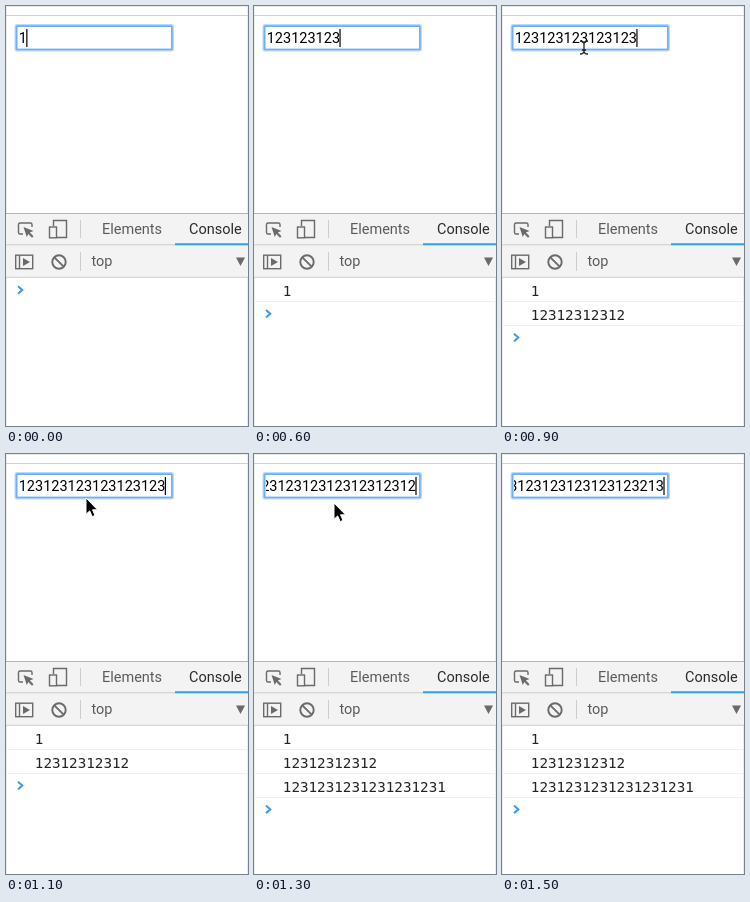
An HTML page for the animation above (1.6 s loop, 242 by 420 pixels).

```html
<!DOCTYPE html>
<html lang="en">
<head>
<meta charset="utf-8">
<style>
  html, body { margin: 0; width: 100%; height: 100%; overflow: hidden; background: #fff; }
  svg { display: block; width: 242px; height: 420px; }
  text { font: 14.5px Roboto, sans-serif; }
  .log text { font: 14.25px "DejaVu Sans Mono", monospace; fill: #222; }
  .icon { fill: none; stroke: #6a6a6a; stroke-width: 1.4; }
  .solid { fill: #6a6a6a; stroke: none; }
</style>
</head>
<body>
<svg viewBox="0 0 242 420">
  <clipPath id="inner"><rect x="12" y="21" width="153" height="23"/></clipPath>
  <path d="M0 .5H242M.5 0V420M241.5 0V420" stroke="#ececec"/>
  <path d="M0 9.5H242" stroke="#d2d2d2"/>

  <rect x="8.5" y="18" width="159.5" height="27.5" rx="2.5" fill="#b9dafb"/>
  <rect x="9.7" y="19.2" width="157" height="25" rx="1.5" fill="#6eaff5"/>
  <rect x="11.5" y="21" width="153.5" height="21.6" fill="#fff"/>
  <g clip-path="url(#inner)">
    <text id="value" y="37"/>
    <path id="caret" d="M0 23V41" stroke="#000" stroke-width="1.2"/>
  </g>

  <rect y="207" width="242" height="64" fill="#f3f3f3"/>
  <path d="M0 207.5H242" stroke="#b4b4b4"/>
  <path d="M0 238.8H242M0 271.3H242M74.5 214V232M74.5 246V265" stroke="#cdcdcd"/>
  <path d="M169 238.3H242" stroke="#2ea3e6" stroke-width="2"/>
  <text x="96" y="228" fill="#5a5a5a">Elements</text>
  <text x="183" y="228" fill="#2b2b2b">Console</text>
  <text x="85.5" y="260.3" fill="#5a5a5a">top</text>
  <path class="solid" d="M230 251.5H239L234.5 260Z"/>

  <g class="icon">
    <path d="M17 228H14Q12.500 228 12.500 226.500V218.500Q12.500 217 14 217H24.500Q26 217 26 218.500V221"/>
    <path class="solid" d="M17.500 221L27.500 225L23.800 226.500L27.500 230.300L26 231.800L22.300 228L20.800 231Z"/>
    <path d="M47.500 220V214.500H60.500V231.500H51"/>
    <rect x="43.500" y="221" width="7" height="10.800"/>
    <rect x="9.700" y="249.200" width="17" height="13.500"/>
    <path d="M13.500 249V263"/>
    <path class="solid" d="M17 252L24 256L17 260Z"/>
    <circle cx="53" cy="256" r="6.700" stroke-width="1.900"/>
    <path d="M48.300 251.300L57.700 260.700" stroke-width="1.900"/>
  </g>

  <g class="log"></g>
  <path id="prompt" d="M12 -3.800L16.300 0L12 3.800" fill="none" stroke="#3b9ae8" stroke-width="2"/>

  <path id="beam" d="M-4 -6Q0 -6 0 -3Q0 -6 4 -6M0 -3V4M-4 7Q0 7 0 4Q0 7 4 7M-2 3H2" fill="none" stroke="#222" stroke-width="1.300"/>
  <path id="arrow" d="M0 0V16.300L3.700 12.900L6.200 18.600L9 17.400L6.500 11.800H11.500Z" stroke="#fff"/>
</svg>
<script>
const $ = id => document.getElementById(id);
const STEP = 100, ROW = 23.8;
const typed = "123".repeat(7) + "213";
const lengths = [1, 2, 4, 5, 6, 8, 9, 11, 13, 15, 16, 18, 19, 20, 22, 24];
const logs = [{ at: 1, size: 1 }, { at: 7, size: 11 }, { at: 12, size: 19 }];
const beamY = { 9: 41, 10: 42 };
const arrowY = { 11: 44, 12: 48, 13: 49 };

document.querySelector(".log").innerHTML = logs.map(({ size }, i) =>
  `<g><text x="28.800" y="${290 + i * ROW}">${typed.slice(0, size)}</text>
   <path d="M0 ${295.5 + i * 24}H242" stroke="#efefef"/></g>`).join("");
const rows = document.querySelectorAll(".log g");

function place(id, x, y) {
  $(id).style.display = y === undefined ? "none" : "";
  if (y !== undefined) $(id).setAttribute("transform", `translate(${x} ${y})`);
}

function draw() {
  const step = Math.floor(performance.now() / STEP) % lengths.length;
  const value = $("value");
  value.textContent = typed.slice(0, lengths[step]);
  const width = value.getComputedTextLength();
  const x = Math.min(12.7, 162 - width);
  value.setAttribute("x", x);
  place("caret", x + width, 0);

  const shown = logs.filter(log => log.at <= step).length;
  rows.forEach((row, i) => row.style.display = i < shown ? "" : "none");
  place("prompt", 0, 284 + shown * ROW);
  place("beam", 82, beamY[step]);
  place("arrow", 80, arrowY[step]);
  requestAnimationFrame(draw);
}
draw();
</script>
</body>
</html>
```
